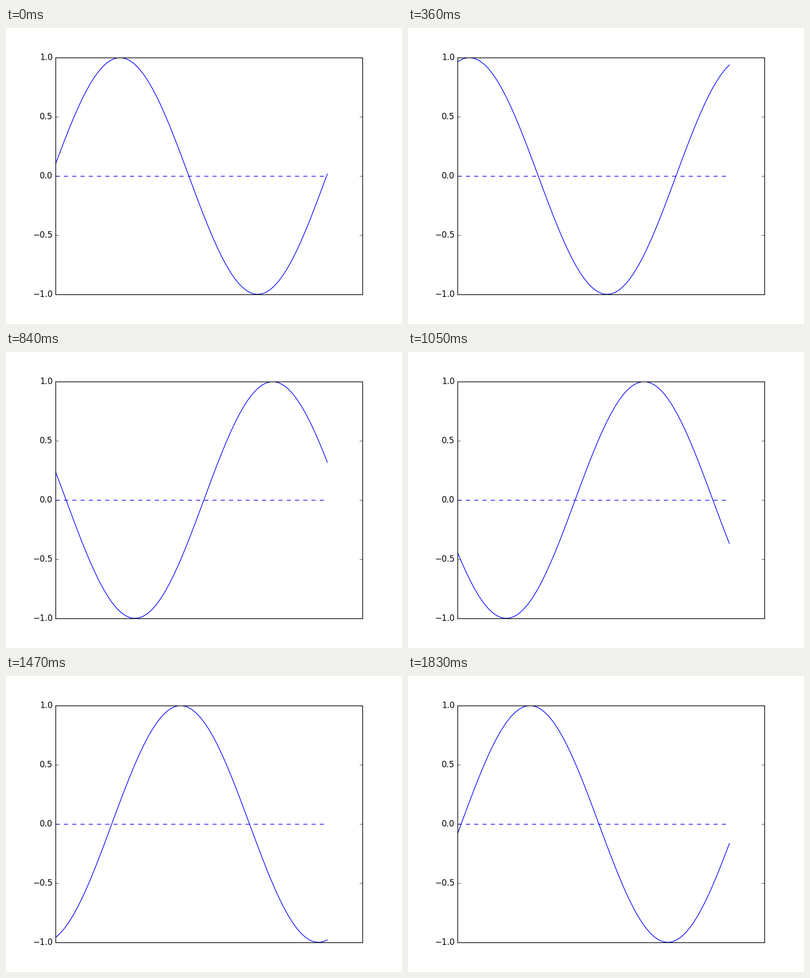
A matplotlib script for the animation above (1860 ms loop, 800x600 px).

```python
import numpy as np
import matplotlib.pyplot as plt
from matplotlib.animation import FuncAnimation

FRAMES = 62
INTERVAL = 30  # ms
STEP = 0.1     # phase advance per frame, also the sample spacing

plt.style.use("classic")
plt.rcParams["font.family"] = "DejaVu Sans"

fig, ax = plt.subplots(figsize=(8, 6), dpi=100, facecolor="white")
x = np.arange(0, 2 * np.pi, STEP)

wave, = ax.plot(x, np.sin(x + STEP), "b-")
ax.plot(x, np.zeros_like(x), "b--")

ax.set_xlim(0, 7)
ax.set_ylim(-1, 1)
ax.set_xticks([])
ax.set_yticks(np.linspace(-1, 1, 5))


def update(i):
    wave.set_ydata(np.sin(x + STEP * (i + 1)))
    return wave,


anim = FuncAnimation(fig, update, frames=FRAMES, interval=INTERVAL,
                     repeat=True, repeat_delay=0, blit=False)
plt.show()
```
